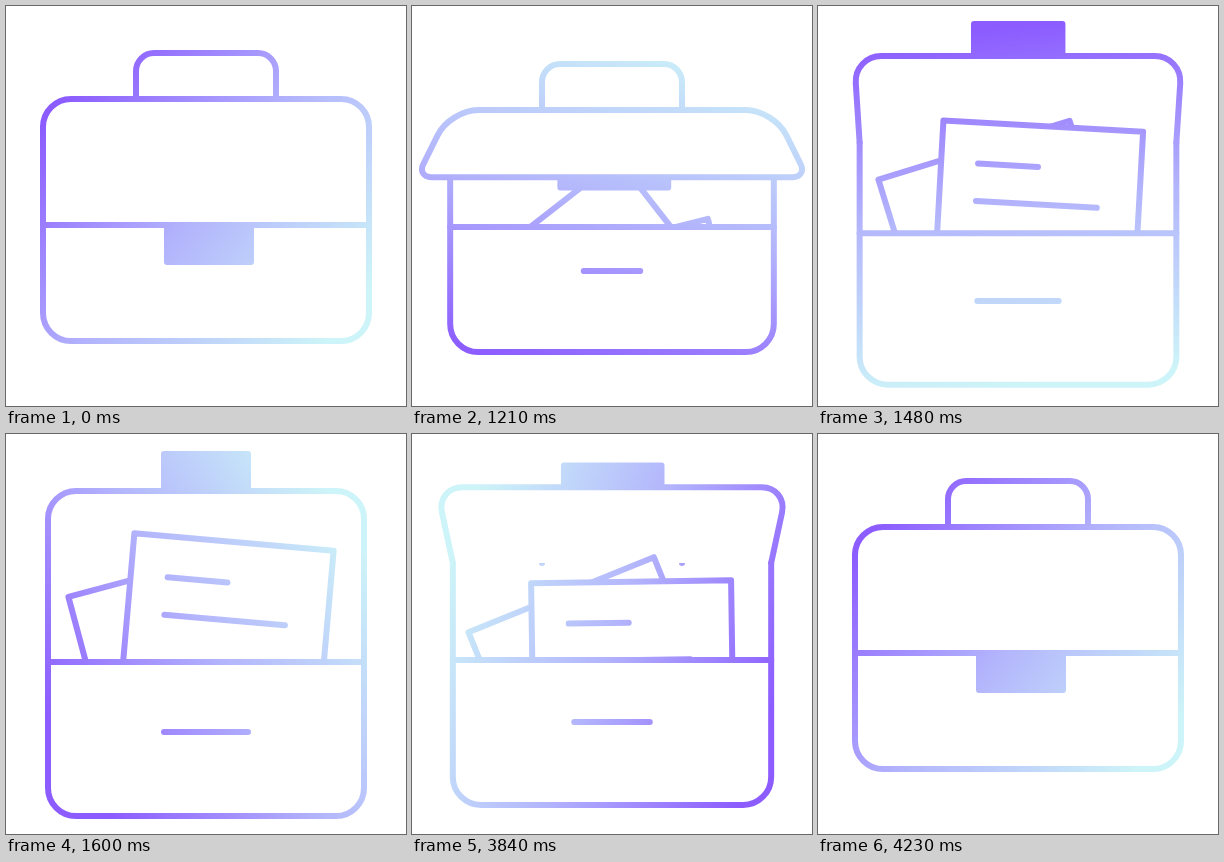
An HTML page with a canvas that plays this animation: 400 px wide and 400 px high, repeating every 4260 ms.

```html
<!DOCTYPE html>
<html lang="en">
<head>
<meta charset="utf-8">
<title>Briefcase</title>
<style>
  html, body { margin: 0; height: 100%; overflow: hidden; background: #fff; }
  canvas { display: block; width: 100vw; height: 100vh; object-fit: contain; }
</style>
</head>
<body>
<canvas id="stage"></canvas>
<script>
const LOOP = 4260, STEP = 30, STEPS = 20;
const OPEN_AT = 1000, CLOSE_AT = 3630;
const EDGE_ON = 0.43;   // moment the lid points at the viewer
const RADIUS = 28;

const canvas = document.getElementById('stage');
const ctx = canvas.getContext('2d');
const ratio = window.devicePixelRatio || 1;
canvas.width = canvas.height = 400 * ratio;

// [time, value] knots, smoothly interpolated
const lidEdge = [[0, 219], [.05, 220], [.2, 217], [.3, 194], [.4, 145], [.5, 96],
                 [.6, 59], [.8, 50], [.95, 56.3], [1, 57]];
const lidHalf = [[0, 163], [.05, 164.5], [.4, 200], [.45, 202], [.6, 180.5], [.8, 164], [1, 158]];
const openTurn = [[0, -140], [.05, -153], [.6, -352], [1, -572]];
const closeTurn = [[0, 148], [.05, 131], [.6, -62], [1, -140]];

const lerp = (a, b, k) => a + (b - a) * k;
const clamp = (v, lo, hi) => Math.min(hi, Math.max(lo, v));

function track(knots, t) {
  const last = knots.length - 1;
  let i = 0;
  while (i < last - 1 && t > knots[i + 1][0]) i++;
  const slope = j => {
    const a = knots[Math.max(0, j - 1)], b = knots[Math.min(last, j + 1)];
    return (b[1] - a[1]) / (b[0] - a[0]);
  };
  const [t0, v0] = knots[i], [t1, v1] = knots[i + 1];
  const d = t1 - t0, u = (t - t0) / d, u2 = u * u, u3 = u2 * u;
  return v0 * (2 * u3 - 3 * u2 + 1) + v1 * (3 * u2 - 2 * u3) +
         d * (slope(i) * (u3 - 2 * u2 + u) + slope(i + 1) * (u3 - u2));
}

function easeInOut(t) {
  const n = 2.12;
  return t < .5 ? Math.pow(2 * t, n) / 2 : 1 - Math.pow(2 - 2 * t, n) / 2;
}

function gradient(degrees) {
  const a = degrees * Math.PI / 180, r = 178;
  const x = r * Math.cos(a), y = r * Math.sin(a);
  const g = ctx.createLinearGradient(200 + x, 200 + y, 200 - x, 200 - y);
  g.addColorStop(0, '#8c5cff');
  g.addColorStop(.5, '#b3b5fc');
  g.addColorStop(1, '#cdf4f8');
  return g;
}

// Points are [x, y, corner size]
function polygon(points, closed = true) {
  const n = points.length;
  ctx.beginPath();
  points.forEach(([x, y, size = 0], i) => {
    if (!size) return i ? ctx.lineTo(x, y) : ctx.moveTo(x, y);
    const toward = ([px, py]) => {
      const len = Math.hypot(px - x, py - y) || 1;
      const d = Math.min(size, len * .55);
      return k => [x + (px - x) / len * d * k, y + (py - y) / len * d * k];
    };
    const before = toward(points[(i + n - 1) % n]), after = toward(points[(i + 1) % n]);
    const start = before(1);
    i ? ctx.lineTo(...start) : ctx.moveTo(...start);
    ctx.bezierCurveTo(...before(.45), ...after(.45), ...after(1));
  });
  if (closed) ctx.closePath();
}

function paint(points, closed = true) {
  polygon(points, closed);
  ctx.fillStyle = '#fff';
  ctx.fill();
  ctx.stroke();
}

function line(x1, y1, x2, y2) {
  ctx.beginPath();
  ctx.moveTo(x1, y1);
  ctx.lineTo(x2, y2);
  ctx.stroke();
}

function paper(x, y, degrees) {
  const a = degrees * Math.PI / 180, c = Math.cos(a), s = Math.sin(a);
  const at = (px, py) => [x + px * c - py * s, y + px * s + py * c];
  paint([at(-100, 0), at(100, 0), at(100, 160), at(-100, 160)]);
  return (x1, x2, py) => line(...at(x1, py), ...at(x2, py));
}

function drawPapers(p, divider) {
  ctx.save();
  ctx.beginPath();
  ctx.rect(0, 0, 400, divider);
  ctx.clip();
  paper(117 + 42 * p, 238 - 101 * p, -45 + 30 * p);
  const rule = paper(190 + 38 * p, 277 - 169 * p, -20 + 25 * p);
  rule(-63, -3, 41);
  rule(-63, 58, 78.5);
  ctx.restore();
}

function drawLid(t, p, hinge, side, ink) {
  const edge = track(lidEdge, t), half = track(lidHalf, t);
  const folded = t < EDGE_ON;
  const tilt = folded ? (t / EDGE_ON) ** 2 : ((1 - t) / (1 - EDGE_ON)) ** 2;
  const tip = folded ? 22 * tilt : lerp(RADIUS, 22, tilt);

  if (edge > hinge) {
    paint([[side, hinge, RADIUS], [400 - side, hinge, RADIUS],
           [200 + half, edge, tip], [200 - half, edge, tip]]);
  } else {
    paint([[side, hinge], [200 - half, edge, tip],
           [200 + half, edge, tip], [400 - side, hinge]], false);
  }

  const width = 90 + 36 * tilt, height = 40 * (1 - tilt);
  ctx.fillStyle = ink;
  ctx.beginPath();
  ctx.roundRect(203 - 3 * p - width / 2, folded ? edge : edge - height, width, height, Math.min(3, height / 2));
  ctx.fill();
}

function draw(t, turn) {
  const p = easeInOut(t);
  const hinge = 93 + 47 * p, bottom = 335 + 47 * p;
  const divider = 219 + 9 * p, side = 37 + 5 * p;
  const lidInFront = track(lidEdge, t) > hinge;
  const ink = gradient(turn);

  ctx.setTransform(ratio, 0, 0, ratio, 0, 0);
  ctx.fillStyle = '#fff';
  ctx.fillRect(0, 0, 400, 400);
  ctx.strokeStyle = ink;
  ctx.lineWidth = 6;
  ctx.lineCap = ctx.lineJoin = 'round';

  polygon([[130, hinge], [130, hinge - 46, 18], [270, hinge - 46, 18], [270, hinge]], false);
  ctx.stroke();

  if (!lidInFront) drawLid(t, p, hinge, side, ink);

  const top = lidInFront ? Math.min(divider, hinge + RADIUS) : hinge;
  line(side, top, side, divider);
  line(400 - side, top, 400 - side, divider);
  drawPapers(p, divider);
  paint([[side, divider], [400 - side, divider],
         [400 - side, bottom, RADIUS], [side, bottom, RADIUS]]);

  const reach = 24 + 18 * p, slotY = 255 + 43 * p;
  line(200 - reach, slotY, 200 + reach, slotY);

  if (lidInFront) drawLid(t, p, hinge, side, ink);
}

function frame(now) {
  const time = now % LOOP;
  const progress = start => clamp(Math.floor((time - start) / STEP), 0, STEPS) / STEPS;
  if (time < CLOSE_AT) {
    const t = progress(OPEN_AT);
    draw(t, track(openTurn, t));
  } else {
    const t = progress(CLOSE_AT);
    draw(1 - t, track(closeTurn, t));
  }
  requestAnimationFrame(frame);
}

const begin = performance.now();
const tick = now => frame(Math.max(0, now - begin));
(function loop() {
  const time = Math.max(0, performance.now() - begin) % LOOP;
  const progress = start => clamp(Math.floor((time - start) / STEP), 0, STEPS) / STEPS;
  const closing = time >= CLOSE_AT;
  const t = progress(closing ? CLOSE_AT : OPEN_AT);
  draw(closing ? 1 - t : t, track(closing ? closeTurn : openTurn, t));
  requestAnimationFrame(loop);
})();
</script>
</body>
</html>
```
